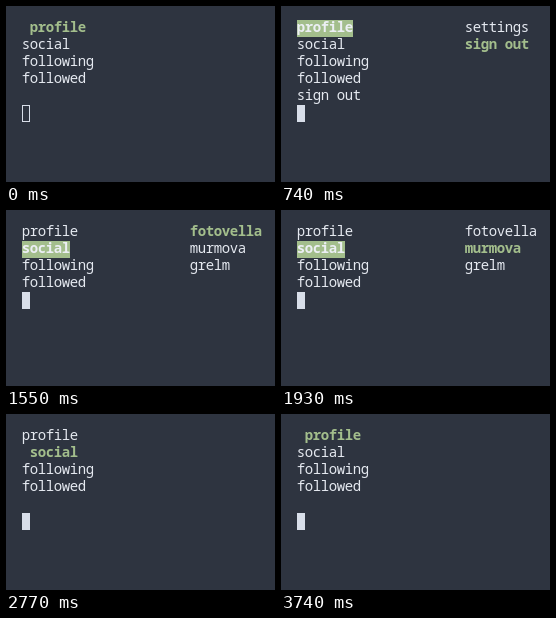
These frames come from a looping animation (269x176 px, 3770 ms). An HTML page with a canvas:

```html
<!DOCTYPE html>
<html lang="en">
<head>
<meta charset="utf-8">
<title>Terminal menu</title>
<style>
  html, body { margin: 0; height: 100%; overflow: hidden; background: #2e3440; }
  canvas { display: block; }
</style>
</head>
<body>
<canvas width="269" height="176"></canvas>
<script>
const ctx = document.querySelector('canvas').getContext('2d', { alpha: false });
const LOOP = 3770;
const LEFT = 16, TOP = 14, CELL_W = 8, CELL_H = 17, BASELINE = 12;
const SUBMENU_COL = 21;
const COLORS = { back: '#2e3440', text: '#e5e9f0', bright: '#eceff4', green: '#a3be8c', cursor: '#d8dee9' };

const MENU = [
  { label: 'profile', children: ['settings', 'sign out'] },
  { label: 'social', children: ['fotovella', 'murmova', 'grelm'] },
  { label: 'following' },
  { label: 'followed' }
];

// Each step: start time, selected item, selected child (null when closed), printed line
const STEPS = [
  [0, 0, null, ''],
  [430, 0, 0, ''],
  [640, 0, 1, ''],
  [740, 0, 1, 'sign out'],
  [1220, 0, null, ''],
  [1470, 1, null, ''],
  [1550, 1, 0, ''],
  [1750, 1, 1, ''],
  [1840, 1, 2, ''],
  [1930, 1, 1, ''],
  [2060, 1, 1, 'murmova'],
  [2240, 1, null, ''],
  [2420, 1, 1, ''],
  [2520, 1, 2, ''],
  [2670, 1, 2, 'grelm'],
  [2770, 1, null, ''],
  [2920, 2, null, ''],
  [3000, 2, null, 'following'],
  [3200, 3, null, ''],
  [3380, 3, null, "[ 'followed' ]"],
  [3580, 2, null, ''],
  [3660, 1, null, ''],
  [3740, 0, null, '']
];
const CURSOR_FILL_TIME = 150;

const cellX = col => LEFT + col * CELL_W;
const cellY = row => TOP + row * CELL_H;

// One character per terminal cell
function write(text, col, row, color = COLORS.text, bold = false) {
  ctx.font = `${bold ? 700 : 500} 14px "Noto Sans Mono", monospace`;
  ctx.textAlign = 'center';
  ctx.fillStyle = color;
  [...text].forEach((char, i) => {
    ctx.fillText(char, cellX(col + i) + CELL_W / 2, cellY(row) + BASELINE);
  });
}

function fillCells(col, row, count, color) {
  ctx.fillStyle = color;
  ctx.fillRect(cellX(col), cellY(row), count * CELL_W, CELL_H);
}

function drawItem(label, row, selected, open) {
  if (!selected) {
    write(label, 0, row);
  } else if (open) {
    fillCells(0, row, label.length, COLORS.green);
    write(label, 0, row, COLORS.bright, true);
  } else {
    write(label, 1, row, COLORS.green, true);
  }
}

// Quoted strings in the output are green
function drawOutput(text, row) {
  let col = 0;
  for (const part of text.split(/('[^']*')/)) {
    write(part, col, row, part.startsWith("'") ? COLORS.green : COLORS.text);
    col += part.length;
  }
}

function drawCursor(row, filled) {
  if (filled) {
    fillCells(0, row, 1, COLORS.cursor);
  } else {
    ctx.strokeStyle = COLORS.cursor;
    ctx.strokeRect(cellX(0) + 0.5, cellY(row) + 0.5, CELL_W - 1, CELL_H - 1);
  }
}

function draw(time) {
  const [, item, child, output] = STEPS.findLast(step => step[0] <= time);
  const open = child !== null;
  ctx.fillStyle = COLORS.back;
  ctx.fillRect(0, 0, 269, 176);

  MENU.forEach(({ label }, row) => drawItem(label, row, row === item, open));
  if (open) {
    MENU[item].children.forEach((label, row) => {
      const selected = row === child;
      write(label, SUBMENU_COL, row, selected ? COLORS.green : COLORS.text, selected);
    });
  }

  const promptRow = MENU.length + (open ? 0 : 1);
  drawOutput(output, promptRow);
  drawCursor(promptRow + (output ? 1 : 0), time >= CURSOR_FILL_TIME);
}

const start = performance.now();
function tick() {
  draw((performance.now() - start) % LOOP);
  requestAnimationFrame(tick);
}
tick();
</script>
</body>
</html>
```
